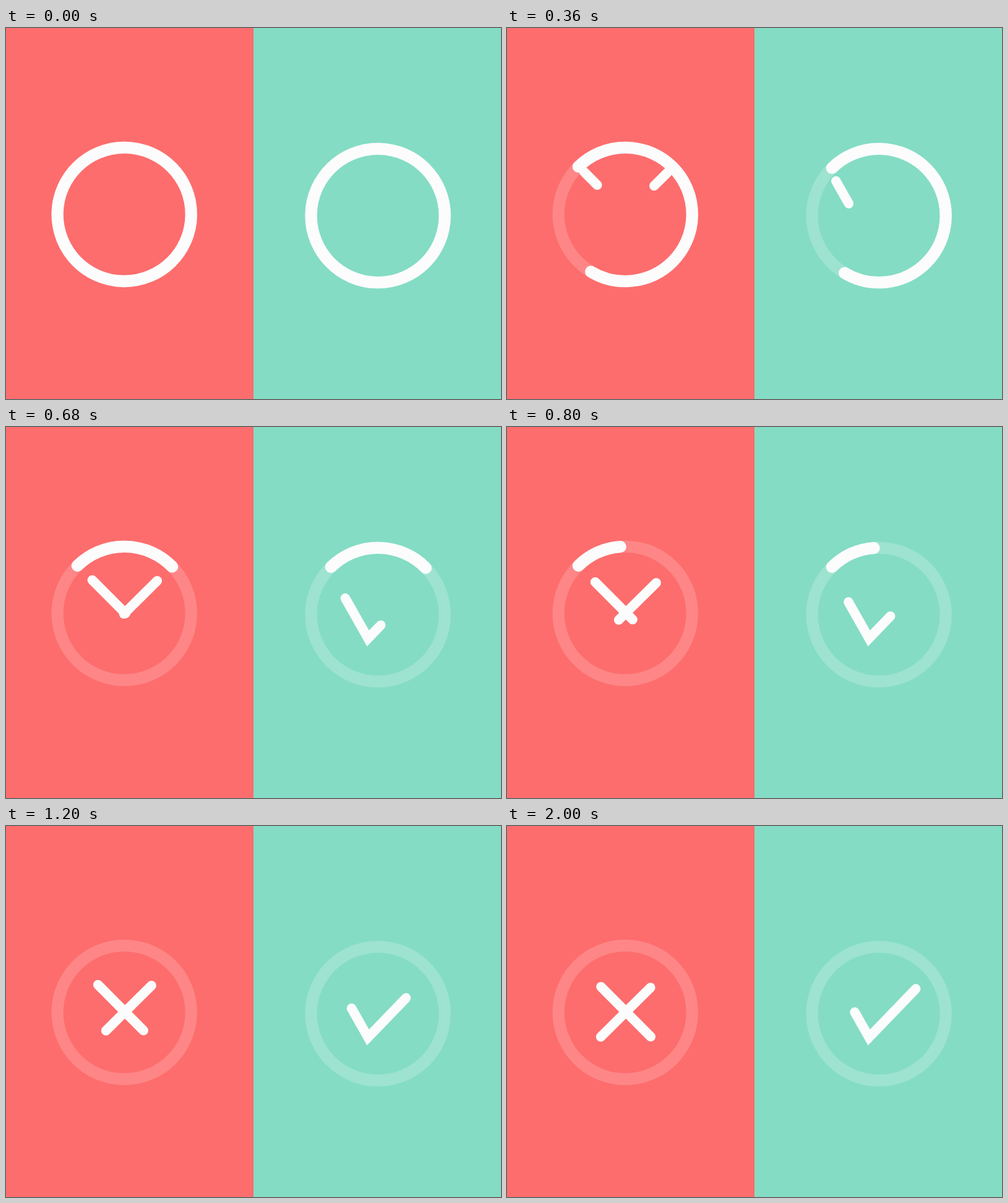
Write an HTML page with a canvas that moves like this. It is 800x600 px and loops after 3.32 s.

```html
<!DOCTYPE html>
<html lang="en">
<head>
<meta charset="utf-8">
<title>Error and success</title>
<style>
  html, body { margin: 0; width: 100%; height: 100%; overflow: hidden; }
  canvas { display: block; }
</style>
</head>
<body>
<canvas id="stage" width="800" height="600"></canvas>
<script>
const ctx = document.getElementById('stage').getContext('2d');
const LOOP = 3320, STEP = 40;
const RING_TIME = 1010, MARK_TIME = 2000;
const WHITE = '#fcfcfc';

const clamp = x => Math.min(1, Math.max(0, x));
const smooth = x => x * x * (3 - 2 * x);
const mix = (a, b, k) => a + (b - a) * k;

// Cubic Bézier easing (0.28, 0, 0.07, 1), solved by bisection
function markEase(x) {
  let low = 0, high = 1;
  for (let i = 0; i < 30; i++) {
    const s = (low + high) / 2, r = 1 - s;
    if (3 * r * r * s * 0.28 + 3 * r * s * s * 0.07 + s * s * s < x) low = s;
    else high = s;
  }
  return smooth(low);
}

function arc(x, y, sweep, color) {
  const start = -134.5 * Math.PI / 180;
  ctx.strokeStyle = color;
  ctx.lineWidth = 19.3;
  ctx.beginPath();
  ctx.arc(x, y, 108.1, start, start + sweep * 2 * Math.PI);
  ctx.stroke();
}

function ring(x, y, trackAlpha, t) {
  arc(x, y, 1, `rgba(255,255,255,${trackAlpha})`);
  const left = 1 - smooth(clamp(t / RING_TIME));
  if (left > 0) arc(x, y, left, WHITE);
}

// Strokes the part of a polyline between two distances along it
function trimmed(points, from, to) {
  if (to - from < 0.01) return;
  ctx.strokeStyle = WHITE;
  ctx.lineWidth = 15.5;
  ctx.beginPath();
  let walked = 0, begun = false;
  for (let i = 1; i < points.length; i++) {
    const [x0, y0] = points[i - 1], [x1, y1] = points[i];
    const length = Math.hypot(x1 - x0, y1 - y0);
    const a = Math.max(0, from - walked) / length;
    const b = Math.min(length, to - walked) / length;
    if (a < b) {
      if (!begun) ctx.moveTo(mix(x0, x1, a), mix(y0, y1, a));
      ctx.lineTo(mix(x0, x1, b), mix(y0, y1, b));
      begun = true;
    }
    walked += length;
  }
  ctx.stroke();
}

// The tail travels to tailEnd while the head reaches the end of the path
function mark(points, tailEnd, headEnd, p) {
  trimmed(points, tailEnd * p, headEnd * p);
}

function draw(t) {
  ctx.fillStyle = '#fd6d6d';
  ctx.fillRect(0, 0, 400, 600);
  ctx.fillStyle = '#84dcc4';
  ctx.fillRect(400, 0, 400, 600);
  ctx.lineCap = 'round';
  ctx.lineJoin = 'miter';

  ring(191.2, 301.4, 0.17, t);
  ring(601.1, 303.5, 0.2, t);

  const p = markEase(clamp(t / MARK_TIME));
  mark([[114, 222], [232.3, 340.8]], 53.7, 167.6, p);
  mark([[269.5, 223.8], [151.5, 341]], 53, 166.3, p);
  mark([[520.5, 227.8], [585.1, 341.8], [660.7, 263.3]], 84.2, 240, p);
}

function tick() {
  const t = performance.now() % LOOP;
  draw(Math.floor(t / STEP) * STEP);
  requestAnimationFrame(tick);
}
tick();
</script>
</body>
</html>
```
